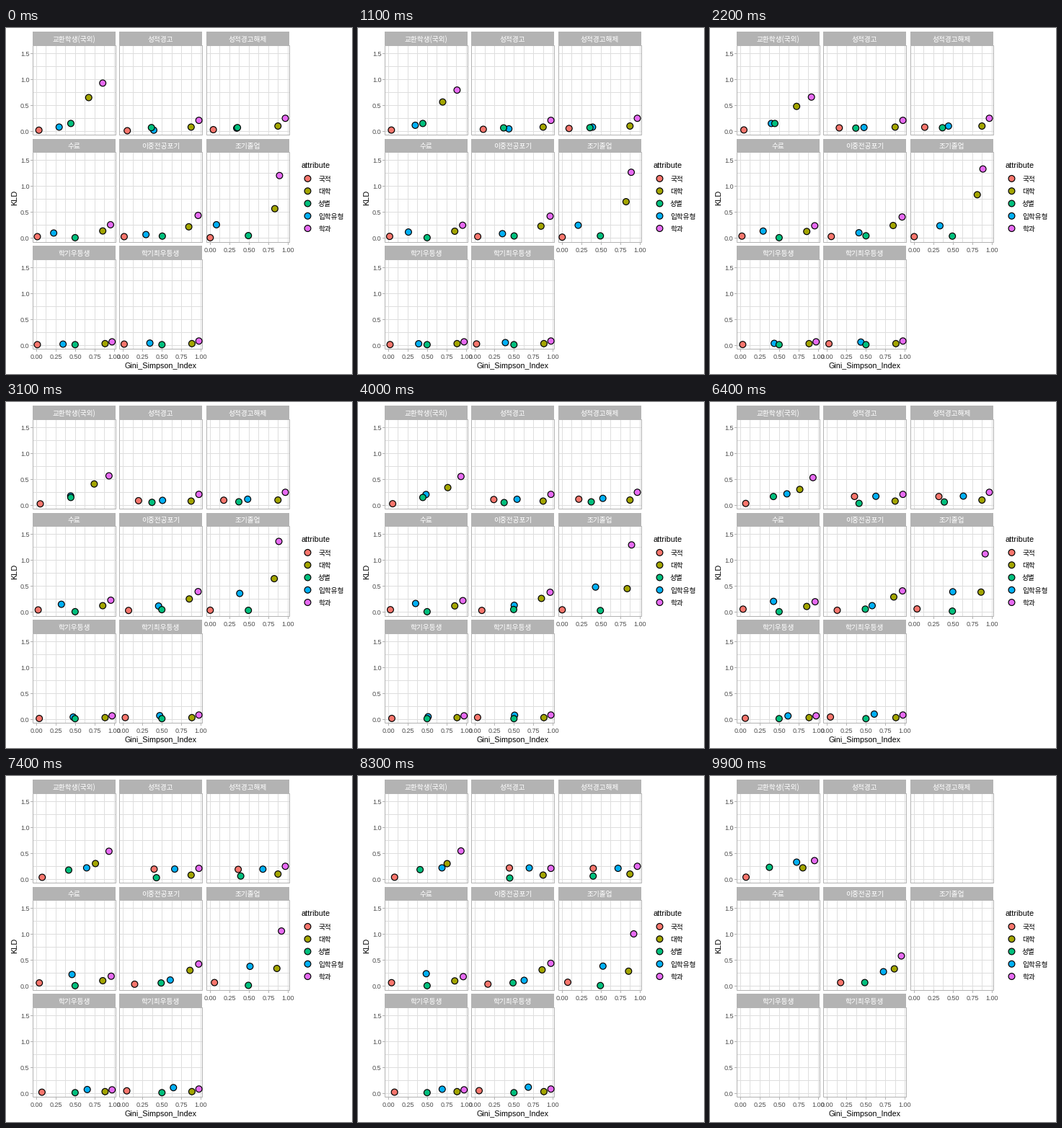
A matplotlib script that plays this animation: 480x480 px, repeating every 10 s.

```python
import numpy as np
import matplotlib.pyplot as plt
from matplotlib.animation import FuncAnimation
from matplotlib.patches import Circle, Rectangle

SIZE, DPI = 480, 72
FRAMES, STEP = 100, 100
LAST_FULL = 88          # only the panels in FINAL go on after this frame

GREY, GRID, TICK_TEXT = "#B3B3B3", "#DEDEDE", "#4D4D4D"
LATIN, HANGUL = "Liberation Sans", "Noto Sans CJK JP"

ATTRIBUTES = {"nation": ("국적", "#F8766D"), "college": ("대학", "#A3A500"),
              "sex": ("성별", "#00BF7D"), "entry": ("입학유형", "#00B0F6"),
              "major": ("학과", "#E76BF3")}
STACK = ("nation", "college", "entry", "sex", "major")

PANEL_W, PANEL_H, STRIP_H = 115, 124.3, 18.6
UNIT_X, UNIT_Y = 108, 71.8

# Key points (x, y) in hundredths, evenly spread in time.
RESTING = dict(college=[(88, 3)], sex=[(49.5, 1)], major=[(97, 8)])
PANELS = {
    "교환학생(국외)": dict(
        nation=[(3, 2), (8, 4)], college=[(67, 65), (77, 31), (75, 30)],
        sex=[(44, 15), (44, 15), (40, 19)], entry=[(29, 8), (50, 22), (71, 22)],
        major=[(85, 93), (93, 57), (93, 53), (93, 55)]),
    "성적경고": dict(
        nation=[(5, 1), (46, 23)], college=[(87, 8)],
        sex=[(36, 7), (37, 5), (45, 2)], entry=[(39, 2), (71, 23)],
        major=[(97, 21)]),
    "성적경고해제": dict(
        nation=[(4, 3), (42, 22)], college=[(87, 10)], sex=[(35, 7), (40, 6)],
        entry=[(34, 6), (74, 22)], major=[(96.5, 25)]),
    "수료": dict(
        nation=[(1, 3), (4, 7)], college=[(85, 14), (85, 10)],
        entry=[(22, 10), (50, 25)], major=[(95, 26), (96, 18)]),
    "이중전공포기": dict(
        nation=[(1, 3), (17, 4)], college=[(84, 22)], sex=[(50, 4)],
        entry=[(29, 7), (52, 14), (64, 11)], major=[(96, 44), (96, 38), (97, 45)]),
    "조기졸업": dict(
        nation=[(0, 1), (0, 5), (8, 8)],
        college=[(83, 57), (81, 84), (84, 37), (86, 39), (85, 26)],
        sex=[(49, 5), (49, 1)],
        entry=[(8, 26), (33, 24), (45, 54), (50, 38), (53, 39)],
        major=[(89, 121), (88, 138), (91, 116), (92, 98)]),
    "학기우등생": dict(nation=[(1, 1), (8, 2)], entry=[(34, 2), (71, 8)],
                  major=[(97, 6.5)]),
    "학기최우등생": dict(nation=[(1, 2), (5, 5)], entry=[(34, 4), (70, 12)]),
}
FINAL = {
    "교환학생(국외)": dict(nation=(7, 4), college=(80, 22), sex=(37, 23),
                     entry=(72, 33), major=(95, 36)),
    "이중전공포기": dict(nation=(17, 7), college=(86, 33.5), sex=(48, 7),
                   entry=(72, 28), major=(95, 58.5)),
}

fig = plt.figure(figsize=(SIZE / DPI, SIZE / DPI), dpi=DPI, facecolor="white")
ax = fig.add_axes([0, 0, 1, 1])
ax.set(xlim=(0, SIZE), ylim=(SIZE, 0))
ax.axis("off")


def line(x0, y0, x1, y1, color):
    ax.plot([x0, x1], [y0, y1], color=color, lw=1, snap=False,
            solid_capstyle="butt", zorder=1)


def label(x, y, text, size=9, color="black", font=LATIN, ha="center", **kw):
    ax.text(x, y, text, fontsize=size, color=color, family=font, ha=ha,
            va="baseline", **kw)


def dot(color, x=0, y=0, z=4):
    return ax.add_patch(Circle((x, y), 4.4, fc=color, ec="black", lw=1.2, zorder=z))


def pixel(v):
    return np.floor(v) + 0.5


def to_x(left, v):
    return left + 5.2 + UNIT_X * v


def to_y(top, v):
    return top + 119.2 - UNIT_Y * v


def track(keys, end=None):
    """Positions (x, y) in every frame, linear between the key points."""
    times = list(np.linspace(0, LAST_FULL, len(keys)))
    if end:
        keys, times = keys + [end], times + [FRAMES - 1]
    return [np.interp(range(FRAMES), times, axis) / 100 for axis in zip(*keys)]


def draw_panel(name, x, y, y_axis, x_axis):
    left, right = int(x), int(x) + PANEL_W
    top, bottom = round(y), round(y + PANEL_H)
    strip = round(y - STRIP_H)
    for v in np.arange(0, 1.01, 0.125):
        gx = pixel(to_x(x, v))
        line(gx, top, gx, bottom, GRID)
    for v in np.arange(0, 1.51, 0.25):
        gy = pixel(to_y(y, v))
        line(left, gy, right, gy, GRID)
    ax.add_patch(Rectangle((left + 0.5, top + 0.5), PANEL_W, bottom - top,
                           fill=False, ec=GREY, lw=1, snap=False, zorder=2))
    ax.add_patch(Rectangle((left, strip), PANEL_W, top - strip, fc=GREY, lw=0,
                           snap=False, zorder=3))
    label(left + PANEL_W / 2, top - 5.2, name, 9.7, "white", HANGUL, zorder=4)

    if y_axis:
        for v in (0, 0.5, 1, 1.5):
            gy = pixel(to_y(y, v))
            line(left - 3, gy, left, gy, GREY)
            label(left - 4.6, gy + 3.5, f"{v:.1f}", color=TICK_TEXT, ha="right")
    if x_axis:
        for v in (0, 0.25, 0.5, 0.75, 1):
            gx = pixel(to_x(x, v))
            line(gx, bottom, gx, bottom + 4, GREY)
            label(gx, bottom + 14, f"{v:.2f}", color=TICK_TEXT)


points = []
for i, (name, moves) in enumerate(PANELS.items()):
    row, col = divmod(i, 3)
    left, top = 37.2 + 120.45 * col, 24 + 148.4 * row
    draw_panel(name, left, top, y_axis=col == 0, x_axis=i + 3 >= len(PANELS))
    paths = {**RESTING, **moves}
    for attr in STACK:
        xs, ys = track(paths[attr], FINAL.get(name, {}).get(attr))
        points.append((dot(ATTRIBUTES[attr][1]), to_x(left, xs), to_y(top, ys),
                       name in FINAL))

label(214.5, 472.5, "Gini_Simpson_Index", 10.7)
ax.text(12, 235.5, "KLD", fontsize=11, family=LATIN, rotation=90,
        ha="center", va="center")
label(410, 193.5, "attribute", 11, ha="left")
for i, (name, color) in enumerate(ATTRIBUTES.values()):
    y = 208.9 + 17.28 * i
    dot(color, 418.5, y)
    label(433, y + 4, name, 9.7, font=HANGUL, ha="left")


def update(frame):
    for point, xs, ys, stays in points:
        point.center = xs[frame], ys[frame]
        point.set_visible(stays or frame <= LAST_FULL)
    return [p[0] for p in points]


anim = FuncAnimation(fig, update, frames=FRAMES, interval=STEP,
                     repeat=True, repeat_delay=0, blit=False)
plt.show()
```
